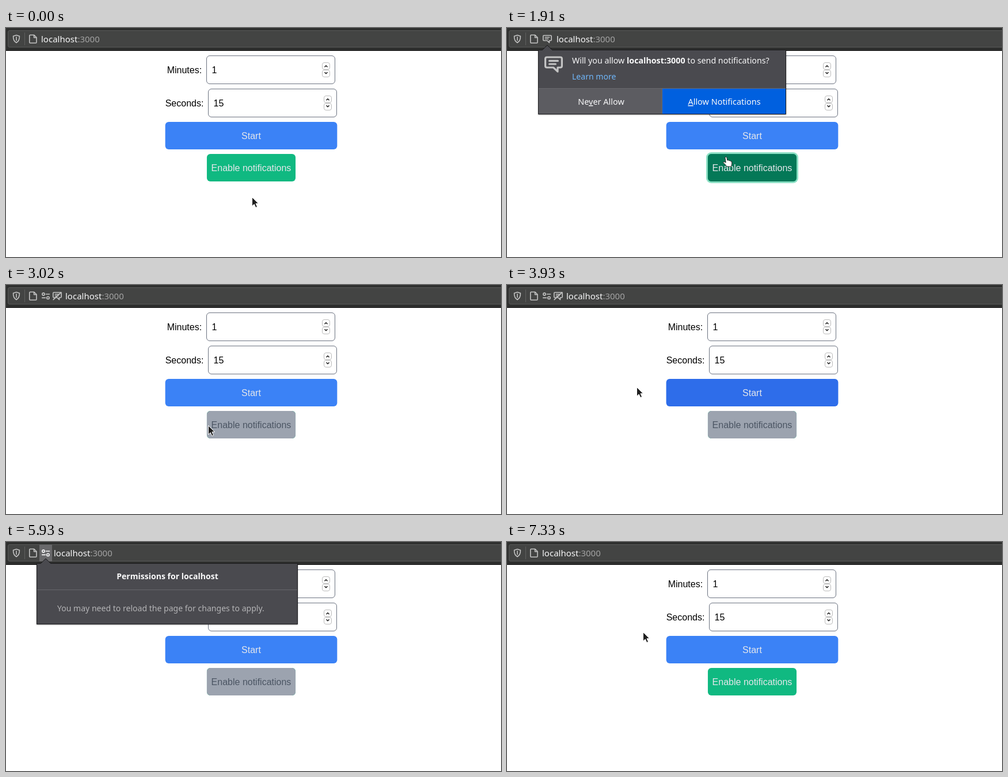
An HTML page that plays this animation: 860 px wide and 400 px high, repeating every 8 s.

```html
<!DOCTYPE html>
<html lang="en">
<head>
<meta charset="utf-8">
<title>Timer notifications</title>
<style>
  html, body { margin: 0; width: 100%; height: 100%; overflow: hidden; background: #fff; }
  svg { display: block; position: absolute; left: 0; top: 0; }
  .page { font: 16px "Liberation Sans", Arial, sans-serif; }
  .ui { font: 14.25px "Noto Sans", "Open Sans", sans-serif; fill: #f9f9fa; }
  .ui .dim { fill: #b4b4b6; }
  .ui .bold { font-weight: 700; }
  .ui .small { font-size: 14.05px; }
  .ui .button { font-size: 14.45px; }
  .u { text-decoration: underline; }
  .middle { text-anchor: middle; }
  .icon { fill: none; stroke: #c4c4c4; stroke-width: 1.6; stroke-linejoin: round; stroke-linecap: round; }
  .panel { fill: #4a4a4f; stroke: #1b1b1d; filter: drop-shadow(0 1px 1px rgba(0, 0, 0, .3)); }
  .line { stroke: #68686d; }
</style>
</head>
<body>
<svg width="860" height="400" viewBox="0 0 860 400">
  <defs>
    <g id="bubble">
      <path d="M2.2 1H13.8Q15.2 1 15.2 2.4V8.6Q15.2 10 13.8 10H11.5V13.6L7.8 10H2.2Q.8 10 .8 8.6V2.4Q.8 1 2.2 1Z"/>
      <path d="M4.3 4.2H11.7M4.3 7H9.7"/>
    </g>
    <g id="crossed">
      <use href="#bubble"/>
      <path d="M1.2 13.6L14.8 .8"/>
    </g>
    <g id="spinner">
      <g fill="#fff" stroke="#bcbcbc">
        <rect x=".5" y=".5" width="13" height="12" rx="3.5"/>
        <rect x=".5" y="13.5" width="13" height="12" rx="3.5"/>
      </g>
      <path d="M4.5 8.3L7 5.8 9.5 8.3M4.5 17.2L7 19.7 9.5 17.2" fill="none" stroke="#222" stroke-width="1.6"/>
    </g>
    <rect id="startBox" x="276.66" y="164" width="298.7" height="48" rx="6"/>
    <rect id="enableBox" x="348.95" y="220" width="154.1" height="48" rx="6"/>
    <text id="enableLabel" class="middle" x="426" y="250">Enable notifications</text>
  </defs>

  <rect width="860" height="400" fill="#fff"/>

  <g id="content" class="page">
    <text x="279.7" y="79">Minutes:</text>
    <text x="276.7" y="137">Seconds:</text>
    <g fill="#fff" stroke="#6b7280">
      <rect x="348.5" y="48.5" width="223" height="49" rx="5.5"/>
      <rect x="351.5" y="106.5" width="223" height="49" rx="5.5"/>
    </g>
    <text x="357.5" y="79">1</text>
    <text x="360.5" y="137">15</text>
    <use href="#spinner" x="549" y="60"/>
    <use href="#spinner" x="552" y="118"/>

    <use href="#startBox" fill="#3b82f6"/>
    <use href="#startBox" id="startHover" fill="#1d4ed8"/>
    <text class="middle" x="426" y="194" fill="#e5e7eb">Start</text>

    <rect id="ring" x="345.95" y="217" width="160.1" height="54" rx="9" fill="#8de0c5"/>
    <use href="#enableBox" fill="#10b981"/>
    <use href="#enableBox" id="enableHover" fill="#047857"/>
    <use href="#enableLabel" fill="#e5e7eb"/>
    <g id="disabled">
      <use href="#enableBox" fill="#9ca3af"/>
      <use href="#enableLabel" fill="#4b5563"/>
    </g>
  </g>

  <rect width="860" height="39" fill="#2e2f2e"/>
  <rect y="39" width="860" height="1" fill="#0e0e0e"/>
  <rect x="3.5" y="4.5" width="870" height="29" rx="2.5" fill="#434443" stroke="#595a59"/>
  <rect id="highlight" x="58" y="5" height="29" fill="#69696b"/>
  <path d="M32.5 8V30" stroke="#5f605f"/>
  <g class="icon">
    <path d="M18 12.6L23.4 14.3C23.6 19.6 21.8 23.6 18 25.8 14.2 23.6 12.4 19.6 12.6 14.3ZM18 15.8V21.8"/>
    <path d="M42 12.3H48.8L53 16.5V25Q53 26.3 51.7 26.3H42Q40.8 26.3 40.8 25V13.5Q40.8 12.3 42 12.3ZM48.6 12.6V16.7H52.8"/>
    <use id="askIcon" href="#bubble" x="62" y="12"/>
    <g id="siteIcons">
      <circle cx="65" cy="16" r="2.1"/><path d="M69.5 16H75.5"/>
      <circle cx="73" cy="22.4" r="2.1"/><path d="M62.8 22.4H68.5"/>
      <use id="blockedIcon" href="#crossed" x="81" y="12"/>
    </g>
  </g>
  <text id="url" class="ui" y="25" style="font-size:15px">localhost<tspan fill="#a3a3a3">:3000</tspan></text>

  <g id="ask" class="ui">
    <path class="panel" d="M54.5 38.5H61.5L70 30 78.5 38.5H484.5V150.5H54.5Z"/>
    <use class="icon" href="#bubble" transform="translate(65 49) scale(2)"/>
    <text x="113" y="62">Will you allow <tspan class="bold">localhost:3000</tspan> to send notifications?</text>
    <text class="small" x="113" y="90" style="fill:#70b7fa">Learn more</text>
    <rect x="55" y="106" width="214" height="44" fill="#5c5c61"/>
    <rect id="neverHover" x="55" y="106" width="214" height="44" fill="#707075"/>
    <rect x="270" y="106" width="214" height="44" fill="#0060df"/>
    <path class="line" d="M55 105.5H484M269.5 106V150"/>
    <text class="button middle" x="163.5" y="134">Ne<tspan class="u">v</tspan>er Allow</text>
    <text class="button middle" x="377.5" y="134"><tspan class="u">A</tspan>llow Notifications</text>
  </g>

  <g id="permissions" class="ui">
    <path class="panel" d="M63.5 37.5H75L83.5 29 92 37.5H516.5V141.5H63.5Z"/>
    <path class="line" d="M64 83.5H516"/>
    <text class="bold small middle" x="290.5" y="65">Permissions for localhost</text>
    <use class="icon" href="#crossed" x="96" y="108"/>
    <text class="button" x="122" y="120">Send Notifications</text>
    <text class="dim small" x="466" y="120" text-anchor="end">Blocked</text>
    <path d="M479 111L487 119M487 111L479 119" stroke="#d0d0d2" stroke-width="2.2"/>
  </g>

  <g id="reload" class="ui">
    <path class="panel" d="M53.5 37.5H60.5L69 29 77.5 37.5H506.5V143.5H53.5Z"/>
    <path class="line" d="M54 83.5H506"/>
    <text class="bold small middle" x="280.5" y="65">Permissions for localhost</text>
    <text class="dim small" x="89" y="121">You may need to reload the page for changes to apply.</text>
  </g>

  <g id="cursor">
    <path id="arrow" d="M.5 .5V16.2L4.2 12.8 6.8 18.6 9.6 17.4 7 11.7H11.6Z" fill="#1f1f1f" stroke="#fff"/>
    <path id="hand" d="M-1.2 1Q.2 -.8 1.8 1L2.8 6.2 4.6 5.6 5.8 7 7.4 6.4 8.6 7.9 10.4 8 10.8 12 9.6 17H2L-1.5 12.8 -4.4 10.4Q-4.4 8.4 -2.4 8.8L.2 10Z"
      fill="#fff" stroke="#222" stroke-linejoin="round"/>
  </g>
</svg>

<script>
const LOOP = 8000;
const el = id => document.getElementById(id);
const clamp = v => Math.min(1, Math.max(0, v));
const smooth = p => p * p * (3 - 2 * p);
const flick = p => 1 - (1 - p) ** 5;

const home = { x: 427, y: 295 };

// Each move starts where the previous one ended; bend bows its path sideways.
const moves = [
  { start: 510, end: 820, x: 381, y: 225 },
  { start: 1900, end: 2220, x: 151, y: 131 },
  { start: 2610, end: 3220, x: 434, y: 239, bend: 50 },
  { start: 3330, end: 3640, x: 397, y: 238 },
  { start: 3830, end: 4640, x: 84, y: 48, bend: -38, ease: flick },
  { start: 4700, end: 4840, x: 83, y: 22 },
  { start: 5090, end: 5530, x: 483, y: 114 },
  { start: 6670, end: 6790, x: 44, y: 132 },
  { start: 7050, end: 7180, x: 236, y: 157 }
];

function cursorAt(t) {
  let from = home;
  for (const { start, end, x, y, bend = 0, ease = smooth } of moves) {
    if (t < start) break;
    if (t >= end) { from = { x, y }; continue; }
    const p = ease((t - start) / (end - start));
    const dx = x - from.x, dy = y - from.y;
    const bow = bend * Math.sin(Math.PI * p) / Math.hypot(dx, dy);
    return { x: from.x + dx * p - dy * bow, y: from.y + dy * p + dx * bow };
  }
  return from;
}

function draw(t) {
  const during = (on, off) => t >= on && t < off;
  const fade = (on, off, ms) => clamp((t - on) / ms) - clamp((t - off) / ms);
  const show = (id, on) => el(id).style.display = on ? "" : "none";

  const levels = {
    enableHover: fade(640, 1990, 150),
    startHover: fade(1990, 2060, 150) + fade(3840, 3900, 150),
    neverHover: fade(2110, LOOP, 70),
    ring: fade(1130, 2470, 90),
    disabled: fade(2600, 6670, 150),
    ask: fade(1130, 2470, 100),
    permissions: fade(4975, 5760, 90),
    reload: fade(5780, 6400, 20) * fade(5780, LOOP, 150)
  };
  for (const id in levels) el(id).style.opacity = levels[id];
  show("content", !during(6670, 7330));

  const asking = during(1130, 2480);
  const siteInfo = during(2480, 6400);
  const blocked = during(2480, 5780);
  const highlighted = during(4770, 6400);
  show("askIcon", asking);
  show("siteIcons", siteInfo);
  show("blockedIcon", blocked);
  el("siteIcons").style.stroke = highlighted ? "#f9f9fa" : "";
  el("highlight").setAttribute("width", highlighted ? 22 + 20 * blocked : 0);
  el("url").setAttribute("x", 61 + 25 * asking + 22 * siteInfo + 20 * blocked);

  const { x, y } = cursorAt(t);
  const over = (left, top, right, bottom) => x >= left && x < right && y >= top && y < bottom;
  const pointing = over(277, 164, 575, 212) || (!blocked && over(349, 220, 503, 268));
  el("cursor").setAttribute("transform", `translate(${Math.round(x)} ${Math.round(y)})`);
  show("cursor", !during(5840, 6790));
  show("arrow", !pointing);
  show("hand", pointing);
}

const origin = performance.now();
function tick() {
  draw((performance.now() - origin) % LOOP);
  requestAnimationFrame(tick);
}
tick();
</script>
</body>
</html>
```
